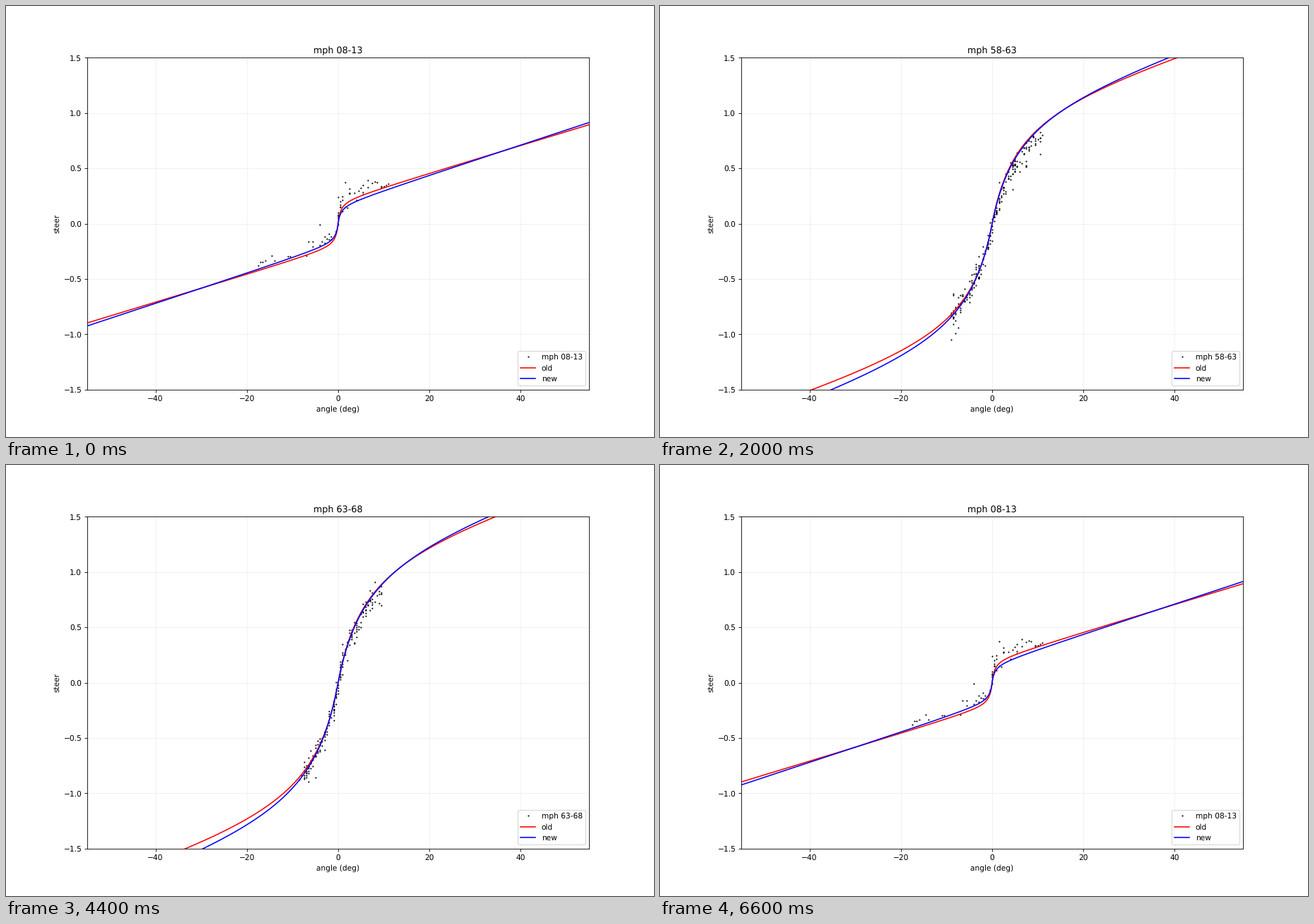
A matplotlib script for the animation above (6.8 s loop, 917x611 px).

```python
import matplotlib.pyplot as plt
import numpy as np
from matplotlib.animation import FuncAnimation

WIDTH, HEIGHT, DPI = 917.001, 611.001, 76.4
STEP_MS = 200
BINS = 17  # speed bins, 5 mph wide, from 08-13 to 88-93

# Steering fits: sigmoid height as a cubic in speed, linear slope,
# extra strength to the left and sigmoid width
OLD = dict(gain=(-2e-7, 1.476e-4, .008824, .1005), slope=.0125,
           left=1.017, widen=1)
NEW = dict(gain=(-2e-7, 1.606e-4, .008524, .0617), slope=.0136,
           left=1.063, widen=1.05)

# How the measured points change with speed, at a few key bins
KEY_BINS = (0, 4, 6, 10, 14, 16)
COUNT = (64, 270, 240, 210, 80, 30)
REACH = {-1: (19, 24, 15, 9, 6.5, 4), 1: (11, 24, 17, 11, 6, 4)}
LIFT = {-1: (.07, .02, 0, 0, -.05, -.05), 1: (.06, .05, -.03, -.07, .04, .04)}
CROWDING = (2.2, 1.3, 1.3, 1.1, 1.1, 1.1)


def mid_speed(k):
    return 10.5 + 5 * k


def steer(angle, k, gain, slope, left, widen):
    """Sigmoid plus a linear term."""
    speed = mid_speed(k)
    width = widen * (-.66 + .118 * speed - .00025 * speed ** 2)
    height = np.polyval(gain, speed) * np.where(angle < 0, left, 1)
    return height * angle / (np.abs(angle) + width) + slope * angle


def make_cloud(k):
    """Points near the old fit, in half-degree steps, with a few strays."""
    rng = np.random.default_rng(k)

    def at_bin(keys):
        return np.interp(k, KEY_BINS, keys)

    count = int(at_bin(COUNT))
    side = rng.choice([-1, 1], count)
    reach = np.where(side < 0, at_bin(REACH[-1]), at_bin(REACH[1]))
    lift = np.where(side < 0, at_bin(LIFT[-1]), at_bin(LIFT[1]))
    angle = side * reach * rng.uniform(0, 1, count) ** at_bin(CROWDING)
    angle = np.round(angle * 2) / 2
    noise = .045 * np.clip(rng.standard_t(4, count), -5, 5)
    return angle, steer(angle, k, **OLD) + lift + noise


clouds = [make_cloud(k) for k in range(BINS)]
grid_angle = np.linspace(-55, 55, 1101)

plt.rcParams["text.hinting"] = "none"
fig, ax = plt.subplots(figsize=(WIDTH / DPI, HEIGHT / DPI), dpi=DPI)
dots, = ax.plot([], [], "ko", markersize=1, label="mph 08-13")
old_line, = ax.plot([], [], "r", label="old")
new_line, = ax.plot([], [], "b", label="new")
ax.set(xlim=(-55, 55), ylim=(-1.5, 1.5), xlabel="angle (deg)", ylabel="steer")
ax.set_yticks(np.arange(-1.5, 1.6, .5))
ax.grid(alpha=.2)
title = ax.set_title("mph 08-13")
legend = ax.legend(loc="lower right", labelspacing=.45)
label = legend.get_texts()[0]


def draw(i):
    k = min(i, 2 * BINS - 1 - i)  # up through the bins, then back down
    text = f"mph {8 + 5 * k:02d}-{13 + 5 * k:02d}"
    title.set_text(text)
    label.set_text(text)
    dots.set_data(*clouds[k])
    old_line.set_data(grid_angle, steer(grid_angle, k, **OLD))
    new_line.set_data(grid_angle, steer(grid_angle, k, **NEW))
    return dots, old_line, new_line, title, label


anim = FuncAnimation(fig, draw, frames=2 * BINS, interval=STEP_MS, repeat=True)
plt.show()
```
